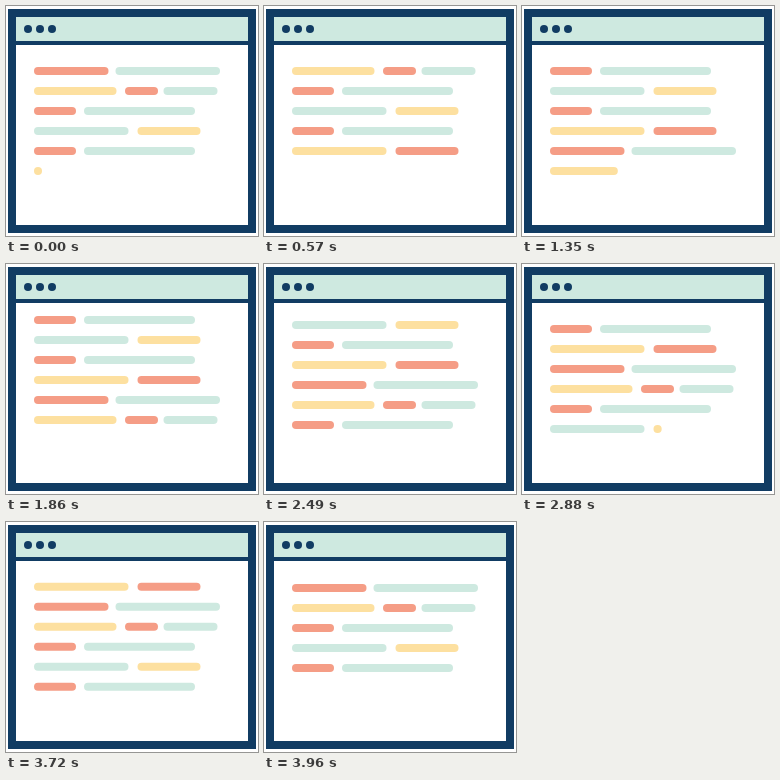
Write an HTML page that moves like this. It is 252 px wide and 230 px high and loops after 3.99 s.

```html
<!DOCTYPE html>
<html lang="en">
<head>
<meta charset="utf-8">
<title>Scrolling code window</title>
<style>
  html, body { margin: 0; width: 100%; height: 100%; overflow: hidden; background: #fff; }
  svg { display: block; width: 100vw; height: 100vh; }
</style>
</head>
<body>
<svg viewBox="0 0 252 230">
  <clipPath id="page"><rect x="10" y="50" width="232" height="169"/></clipPath>
  <rect x="2" y="3" width="248" height="224" fill="#113c63"/>
  <rect x="10" y="11" width="232" height="24" fill="#cee9e0"/>
  <rect x="10" y="39" width="232" height="180" fill="#fff"/>
  <g fill="#113c63">
    <circle cx="22" cy="23" r="4"/>
    <circle cx="34" cy="23" r="4"/>
    <circle cx="46" cy="23" r="4"/>
  </g>
  <g clip-path="url(#page)"><g id="code" stroke-width="8" stroke-linecap="round"></g></g>
</svg>
<script>
const LOOP = 3990, TOP = 65, PITCH = 20, SCROLL = 300;
const RED = '#f59d86', YELLOW = '#fde0a0', MINT = '#cee9e0';

// Each bar: colour, left edge, right edge.
const short = [[RED, 28, 70], [MINT, 78, 189]];
const lines = [
  [[RED, 28, 102.5], [MINT, 109.5, 214]],
  [[YELLOW, 28, 110.5], [RED, 119, 152], [MINT, 157.5, 211.5]],
  short,
  [[MINT, 28, 122.5], [YELLOW, 131.5, 194.5]],
  short,
  [[YELLOW, 28, 122.5], [RED, 131.5, 194.5]]
];

// Each cycle types one new line, then scrolls up by one line (ms).
const cycles = [
  { begin: 0, type: 0, scroll: 273 },
  { begin: 573, type: 573, scroll: 870 },
  { begin: 1170, type: 1238, scroll: 1720 },
  { begin: 2020, type: 2095, scroll: 2405 },
  { begin: 2705, type: 2738, scroll: 3022 },
  { begin: 3322, type: 3398, scroll: 3700 }
];

const clamp = v => Math.min(1, Math.max(0, v));
const ease = v => { const u = clamp(v); return u * u * (3 - 2 * u); };

function make(tag, attrs, parent) {
  const el = document.createElementNS('http://www.w3.org/2000/svg', tag);
  for (const key in attrs) el.setAttribute(key, attrs[key]);
  return parent.appendChild(el);
}

const code = document.getElementById('code');
const rows = lines.map(bars => {
  const group = make('g', {}, code);
  return {
    group,
    bars: bars.map(([stroke, left, right]) => ({
      x1: left + 4,
      x2: right - 4,
      el: make('line', { stroke, x1: left + 4, y1: 0, y2: 0 }, group)
    }))
  };
});

function render(t) {
  const current = cycles.findLastIndex(c => t >= c.begin);
  const { type, scroll } = cycles[current];
  const shift = PITCH * ease((t - scroll) / SCROLL);
  const typed = clamp((t - type) / (scroll - 8 - type));

  rows.forEach(({ group, bars }, i) => {
    const slot = (i - current + rows.length) % rows.length;
    const progress = slot === rows.length - 1 ? typed * bars.length : bars.length;
    group.setAttribute('transform', `translate(0 ${TOP + slot * PITCH - shift})`);
    bars.forEach(({ el, x1, x2 }, n) => {
      const grown = ease(progress - n);
      el.setAttribute('x2', x1 + (x2 - x1) * grown);
      el.setAttribute('visibility', grown > 0 ? 'visible' : 'hidden');
    });
  });
}

const start = performance.now();
function tick() {
  render((performance.now() - start) % LOOP);
  requestAnimationFrame(tick);
}
tick();
</script>
</body>
</html>
```
